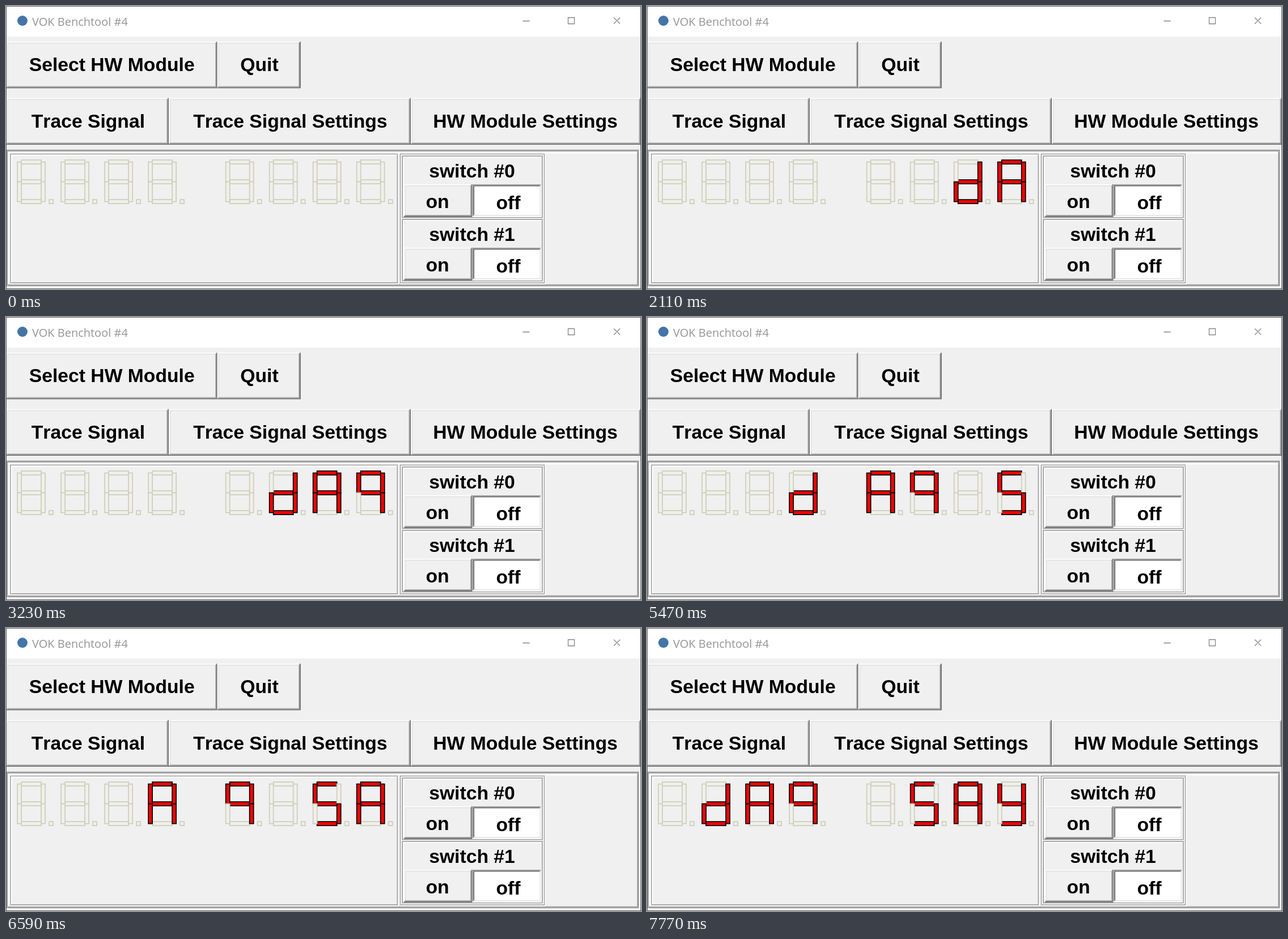
An HTML page that plays this animation: 1120 by 500 pixels, repeating every 8000 ms.

```html
<!DOCTYPE html>
<html lang="en">
<head>
<meta charset="utf-8">
<title>Bench panel</title>
<style>
html, body { margin: 0; width: 100%; height: 100%; overflow: hidden; background: #f0f0f0; }
svg { display: block; width: 1120px; height: 500px; }
text { font: bold 19.25px "Liberation Sans", Arial, sans-serif; font-kerning: none; text-anchor: middle; }
.title { font: 20px "Open Sans", "Noto Sans", sans-serif; fill: #959595; text-anchor: start; }
.icons { fill: none; stroke: #858585; stroke-width: 1.3; }
.seg { fill: #f0f0ea; stroke: #cdcdbe; stroke-width: 1; }
.seg.on { fill: #f00; stroke: #000; }
</style>
</head>
<body>
<svg id="stage" viewBox="0 0 1120 500"></svg>
<script>
const LOOP = 8000;
const MESSAGE = "dAq SAy";
const STEPS = [960, 2110, 3230, 4380, 5470, 6590, 7710];
const LAG = [0, 0, 0, 0, 0, 90, 60];   // delay of the leading character
const DIGIT_X = [11, 55, 99, 143, 221, 265, 309, 353];
const GLYPHS = { d: "bcdeg", A: "abcefg", q: "abcfg", S: "acdfg", y: "bcdfg", " ": "" };

// Segment boxes relative to a digit, in painting order: x, y, width, height
const SEGMENTS = {
  a: [4.5, 155.5, 20, 4], g: [4.5, 175.5, 20, 4], d: [4.5, 195.5, 20, 4],
  f: [.5, 157.5, 4, 20], b: [24.5, 157.5, 4, 20],
  e: [.5, 177.5, 4, 20], c: [24.5, 177.5, 4, 20],
  p: [32.5, 195.5, 4, 4]
};

// Edge colours: outer top-left, outer bottom-right, inner top-left, inner bottom-right, face
const RAISED = ["#fff", "#696969", "#e3e3e3", "#a0a0a0", "#f0f0f0"];
const SUNKEN = ["#a0a0a0", "#fff", "#696969", "#e3e3e3", "#fff"];
const GROOVE = ["#a0a0a0", "#fff", "#fff", "#a0a0a0", "none"];

const rect = (x, y, w, h, attrs) =>
  `<rect x="${x}" y="${y}" width="${w}" height="${h}" ${attrs}/>`;
const box = (x, y, w, h, color) => rect(x, y, w, h, `fill="${color}"`);
const label = (x, y, s) => `<text x="${x}" y="${y}">${s}</text>`;

function edge(x, y, w, h, t, light, dark) {
  const m = t / 2, r = x + w, b = y + h;
  const line = (d, color) =>
    `<path d="${d}" fill="none" stroke="${color}" stroke-width="${t}"/>`;
  return line(`M${x + m} ${b}V${y + m}H${r}`, light) +
    line(`M${x} ${b - m}H${r - m}V${y}`, dark);
}

const bevel = (x, y, w, h, c, t = 1) => box(x, y, w, h, c[4]) +
  edge(x, y, w, h, t, c[0], c[1]) +
  edge(x + t, y + t, w - 2 * t, h - 2 * t, t, c[2], c[3]);

const button = (x, y, w, s, cx) => bevel(x, y, w, 47, RAISED) + label(cx, y + 29.7, s);

const toggle = (y, n) => bevel(399, y, 143, 64, GROOVE) +
  label(469.7, y + 22.2, "switch #" + n) +
  bevel(401, y + 29, 69, 33, RAISED) + label(434.9, y + 53, "on") +
  bevel(470, y + 29, 70, 33, SUNKEN) + label(506.3, y + 54, "off");

const digit = x => "<g>" + Object.entries(SEGMENTS).map(([name, [dx, y, w, h]]) =>
  rect(x + dx, y, w, h, `class="seg" data-name="${name}"`)).join("") + "</g>";

const stage = document.getElementById("stage");
stage.innerHTML =
  box(0, 0, 1120, 500, "#f0f0f0") + box(0, 0, 1120, 54, "#fff") +
  `<circle cx="29" cy="26" r="9" fill="#4474a8"/>
   <text class="title" x="46" y="35">VOK Benchtool #4</text>
   <path class="icons" d="M911.5 26.5h12M991.5 20.5h11v11h-11zM1072 20.5l11 11M1083 20.5l-11 11"/>
   <g transform="scale(1.75)">` +
  button(0, 36, 213, "Select HW Module", 106.7) +
  button(213, 36, 84, "Quit", 255.4) +
  button(0, 93, 164, "Trace Signal", 82.8) +
  button(164, 93, 244, "Trace Signal Settings", 286.5) +
  button(408, 93, 232, "HW Module Settings", 523.4) +
  bevel(0, 145, 640, 140, GROOVE, 2) +
  bevel(4, 149, 392, 132, GROOVE) +
  bevel(397, 149, 147, 132, GROOVE) +
  toggle(151, 0) + toggle(215, 1) +
  `<g id="digits">${DIGIT_X.map(digit).join("")}</g></g>` +
  rect(.5, .5, 1119, 499, 'fill="none" stroke="#5a5a5a"');

const digits = [...document.getElementById("digits").children];

function draw(t) {
  const count = STEPS.filter(s => t >= s).length;
  const lead = 8 - count;
  const late = count > 0 && t < STEPS[count - 1] + LAG[count - 1];
  digits.forEach((g, i) => {
    const shown = late && i === lead ? " " : MESSAGE[i - lead] || " ";
    for (const seg of g.children)
      seg.classList.toggle("on", GLYPHS[shown].includes(seg.dataset.name));
  });
}

const start = performance.now();
function tick() {
  draw((performance.now() - start) % LOOP);
  requestAnimationFrame(tick);
}
tick();
</script>
</body>
</html>
```
